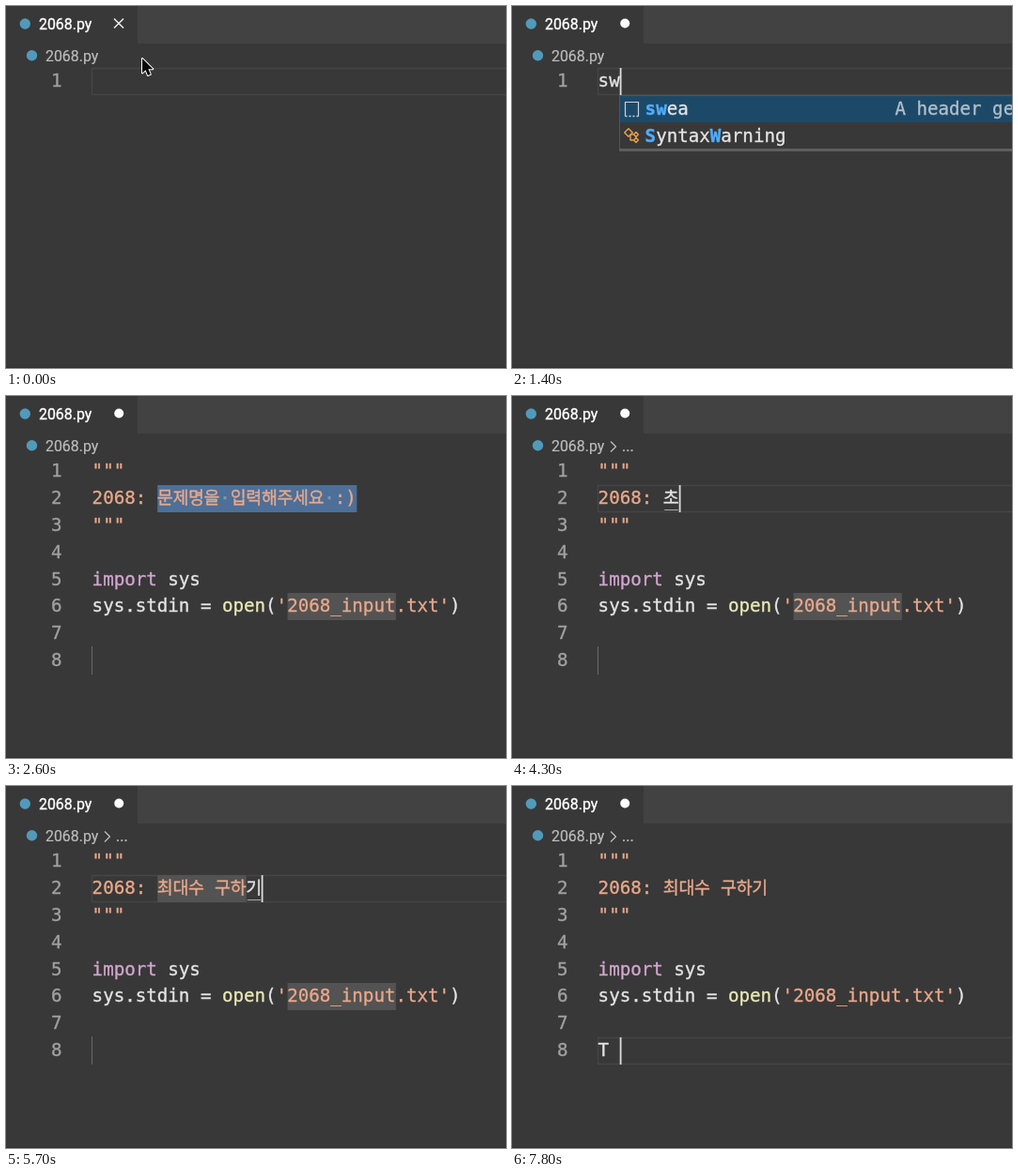
An HTML page with a canvas for the animation above (8000 ms loop, 532 by 386 pixels).

```html
<!DOCTYPE html>
<html lang="ko">
<head>
<meta charset="utf-8">
<title>2068.py</title>
<style>
html, body { margin: 0; width: 100%; height: 100%; overflow: hidden; background: #383838; }
canvas { display: block; }
</style>
</head>
<body>
<canvas id="stage" width="532" height="386"></canvas>
<script>
const ctx = document.getElementById('stage').getContext('2d');
const LOOP = 8000, LEFT = 92, CHAR = 11.53, HANGUL = 16.6, ROW = 28.86;
const MONO = '19.15px "DejaVu Sans Mono", monospace';
const KOREAN = '18.4px "Noto Sans CJK KR", "Noto Sans CJK", sans-serif';
const UI = '15.9px Roboto, sans-serif';
const C = {
  bg: '#383838', bar: '#424242', text: '#e4e4e4', string: '#e9a88a', keyword: '#d4a6d0',
  call: '#e9e8b6', number: '#a0a0a0', mark: '#535353', select: '#4d6f98', edge: '#454545',
  match: '#50aefc', caret: '#dcdcdc', crumb: '#bcbcbc', icon: '#519aba', symbol: '#e9a24b'
};

// Time in ms, committed title, syllable being composed
const TITLE = [
  [4000, '', 'ㅊ'], [4200, '', '초'], [4400, '', '최'], [4500, '', '쵣'],
  [4600, '최', '대'], [4700, '최', '댓'], [4800, '최대', '수'], [4900, '최대수 ', ''],
  [5000, '최대수 ', 'ㄱ'], [5100, '최대수 ', '구'], [5200, '최대수 ', '궇'],
  [5400, '최대수 구', '하'], [5500, '최대수 구', '학'], [5700, '최대수 구하', '기'],
  [6200, '최대수 구하기', '']
];
const TYPED = [[0, ''], [1000, 's'], [1300, 'sw'], [1500, 'swe'], [1600, 'swea']];
const PROMPT = '문제명을 입력해주세요 :)';

const latest = (steps, t) => steps.filter(s => s[0] <= t).pop();
const isWide = ch => ch > '\u3000';
const advance = ch => isWide(ch) ? HANGUL : CHAR;
const width = s => [...s].reduce((sum, ch) => sum + advance(ch), 0);
const rowTop = row => 66 + (row - 1) * ROW;

function rect(x, y, w, h, color) {
  ctx.fillStyle = color;
  ctx.fillRect(x, y, w, h);
}

function disc(x, y, r, color) {
  ctx.fillStyle = color;
  ctx.beginPath();
  ctx.arc(x, y, r, 0, 7);
  ctx.fill();
}

function path(points, color, lineWidth) {
  ctx.beginPath();
  points.forEach(([x, y]) => ctx.lineTo(x, y));
  ctx.strokeStyle = color;
  ctx.lineWidth = lineWidth;
  ctx.stroke();
}

// The thin outline gives the text its slightly heavier weight
function label(s, x, y, color, font = UI, weight = .35) {
  ctx.font = font;
  ctx.fillStyle = ctx.strokeStyle = color;
  ctx.lineWidth = weight;
  ctx.lineJoin = 'round';
  ctx.fillText(s, x, y);
  ctx.strokeText(s, x, y);
}

function code(s, x, row, color) {
  const y = Math.round(rowTop(row) + 20.1);
  for (const ch of s) {
    label(ch, x - .4, y, color, isWide(ch) ? KOREAN : MONO);
    x += advance(ch);
  }
  return x;
}

const caret = (x, row) => rect(Math.round(x) - .3, Math.round(rowTop(row)), 1.8, 29, C.caret);
const box = (x, row, w, color) => rect(x, Math.round(rowTop(row)), w, 29, color);

function currentLine(row) {
  ctx.strokeStyle = C.edge;
  ctx.lineWidth = 1.3;
  ctx.strokeRect(91.5, Math.round(rowTop(row)) + .5, 460, 28);
}

function snippetIcon(x, y) {
  path([[x, y + 15], [x, y], [x + 14, y], [x + 14, y + 15]], '#c9d3da', 1.2);
  ctx.setLineDash([2, 2]);
  path([[x, y + 15], [x + 14, y + 15]], '#c9d3da', 1.5);
  ctx.setLineDash([]);
}

function classIcon(x, y) {
  const diamond = (cx, cy, r) => path(
    [[cx - r, cy], [cx, cy - r], [cx + r, cy], [cx, cy + r], [cx - r, cy], [cx, cy - r]],
    C.symbol, 1.4);
  diamond(x + 5, y + 5, 4.3);
  diamond(x + 13, y + 7, 2.4);
  diamond(x + 13, y + 13, 2.4);
  path([[x + 8, y + 7], [x + 10.5, y + 7]], C.symbol, 1.4);
  path([[x + 7, y + 7], [x + 7, y + 13], [x + 10.5, y + 13]], C.symbol, 1.4);
}

// Items: name, matched character positions, detail (snippets only)
function popup(x, row, items) {
  const top = Math.round(rowTop(row + 1));
  const h = items.length * 29;
  rect(x, top, 532 - x, h + 1, '#383838');
  rect(x + 1, top + 1, 532 - x, 28, '#1d4969');
  items.forEach(([name, hits, detail], i) => {
    const y = top + i * 29;
    if (detail) snippetIcon(x + 6.5, y + 7.5);
    else classIcon(x + 5, y + 6);
    [...name].forEach((ch, k) => {
      const hit = hits.includes(k);
      label(ch, x + 27.6 + k * CHAR, y + 21, hit ? C.match : C.text, (hit ? 'bold ' : '') + MONO);
    });
    if (detail) label(detail, 407.4, y + 21, '#b0c0cb', MONO);
  });
  path([[x + .5, top + h], [x + .5, top + .5], [533, top + .5]], '#555', 1);
  rect(x, top + h - 1, 532 - x, 3, '#5e5e5e');
}

function pointer(t) {
  const p = Math.min(1, Math.max(0, (t - 100) / 450));
  const e = p * p * (3 - 2 * p);
  const x = 145 - 4 * e, y = 56 + 36 * e;
  if (y > 67) {
    const beam = [[x - 3, y], [x, y + 2], [x + 3, y], [x, y + 2], [x, y + 16],
      [x - 3, y + 18], [x, y + 16], [x + 3, y + 18]];
    path(beam, '#ddd', 2.6);
    path(beam, '#111', 1);
    return;
  }
  const shape = [[0, 0], [0, 15.5], [3.6, 12.2], [6, 18], [8.8, 16.8], [6.4, 11.2], [11.3, 11.2], [0, 0], [0, 5]];
  path(shape.map(([dx, dy]) => [x + dx, y + dy]), '#fff', 2);
  ctx.fillStyle = '#080808';
  ctx.fill();
}

function chrome(t) {
  rect(0, 0, 532, 386, C.bg);
  rect(140, 0, 392, 40, C.bar);
  rect(0, 385, 532, 1, '#303033');
  disc(20.3, 19, 5.7, C.icon);
  disc(27.5, 52.7, 5.7, C.icon);
  label('2068.py', 35, 25, '#fff');
  label('2068.py', 42, 59, C.crumb, UI, .2);
  if (t < 1000) {
    path([[115, 13.5], [125, 23.5]], '#f0f0f0', 1.5);
    path([[125, 13.5], [115, 23.5]], '#f0f0f0', 1.5);
  } else {
    disc(120.2, 18.5, 5, '#fff');
  }
  if (t >= 3500) {
    path([[105, 48.5], [110.5, 54], [105, 59.5]], C.crumb, 1.3);
    label('...', 117, 59, C.crumb);
  }
}

function lineNumbers(count) {
  for (let n = 1; n <= count; n++) code(String(n), 48.5, n, C.number);
}

function trigger(t) {
  const typed = latest(TYPED, t)[1];
  currentLine(1);
  lineNumbers(1);
  const end = code(typed, LEFT, 1, C.text);
  if (t >= 500) caret(end, 1);
  if (t >= 1400) {
    const items = [['swea', [0, 1, 2, 3].slice(0, typed.length), 'A header generator']];
    if (typed === 'sw') items.push(['SyntaxWarning', [0, 6]]);
    popup(114, 1, items);
  }
  if (t < 1000) pointer(t);
}

function promptText(t, x) {
  const w = width(PROMPT);
  box(x, 2, w, C.select);
  code(PROMPT, x, 2, C.string);
  [...PROMPT].forEach((ch, i) => {
    if (ch === ' ') code('·', x + width(PROMPT.slice(0, i)), 2, '#8796a6');
  });
  if (t < 2500 || (t >= 3000 && t < 3500)) caret(x + w, 2);
}

function titleText(t, x) {
  const [, done, composing] = latest(TITLE, t);
  const editing = t < 6500;
  if (editing) {
    currentLine(2);
    box(x, 2, width(done), C.mark);
  }
  const mid = code(done, x, 2, C.string);
  const end = code(composing, mid, 2, C.text);
  if (composing) rect(mid + 1, 121, HANGUL - 2, 1, '#aaa');
  if (editing) caret(end, 2);
}

function template(t) {
  const filling = t < 6500;
  if (!filling) currentLine(8);
  lineNumbers(8);
  code('"""', LEFT, 1, C.string);
  (t < 4000 ? promptText : titleText)(t, code('2068: ', LEFT, 2, C.string));
  code('"""', LEFT, 3, C.string);
  code(' sys', code('import', LEFT, 5, C.keyword), 5, C.text);
  if (filling) box(LEFT + 18 * CHAR, 6, 10 * CHAR, C.mark);
  let x = code('sys.stdin = ', LEFT, 6, C.text);
  x = code('open', x, 6, C.call);
  x = code('(', x, 6, C.text);
  x = code("'2068_input.txt'", x, 6, C.string);
  code(')', x, 6, C.text);

  if (filling) {
    rect(91, 267, 1, 30, '#6a6a6a');
    return;
  }
  const typed = t < 7600 ? '' : t < 7800 ? 'T' : 'T ';
  const end = code(typed, LEFT, 8, C.text);
  if (t < 7100 || t >= 7500) caret(end, 8);
  if (typed === 'T') popup(103, 8, [['TabError', [0]], ['TimeoutError', [0]], ['TypeError', [0]]]);
}

function draw() {
  const t = performance.now() % LOOP;
  chrome(t);
  (t < 2000 ? trigger : template)(t);
  requestAnimationFrame(draw);
}
draw();
</script>
</body>
</html>
```
